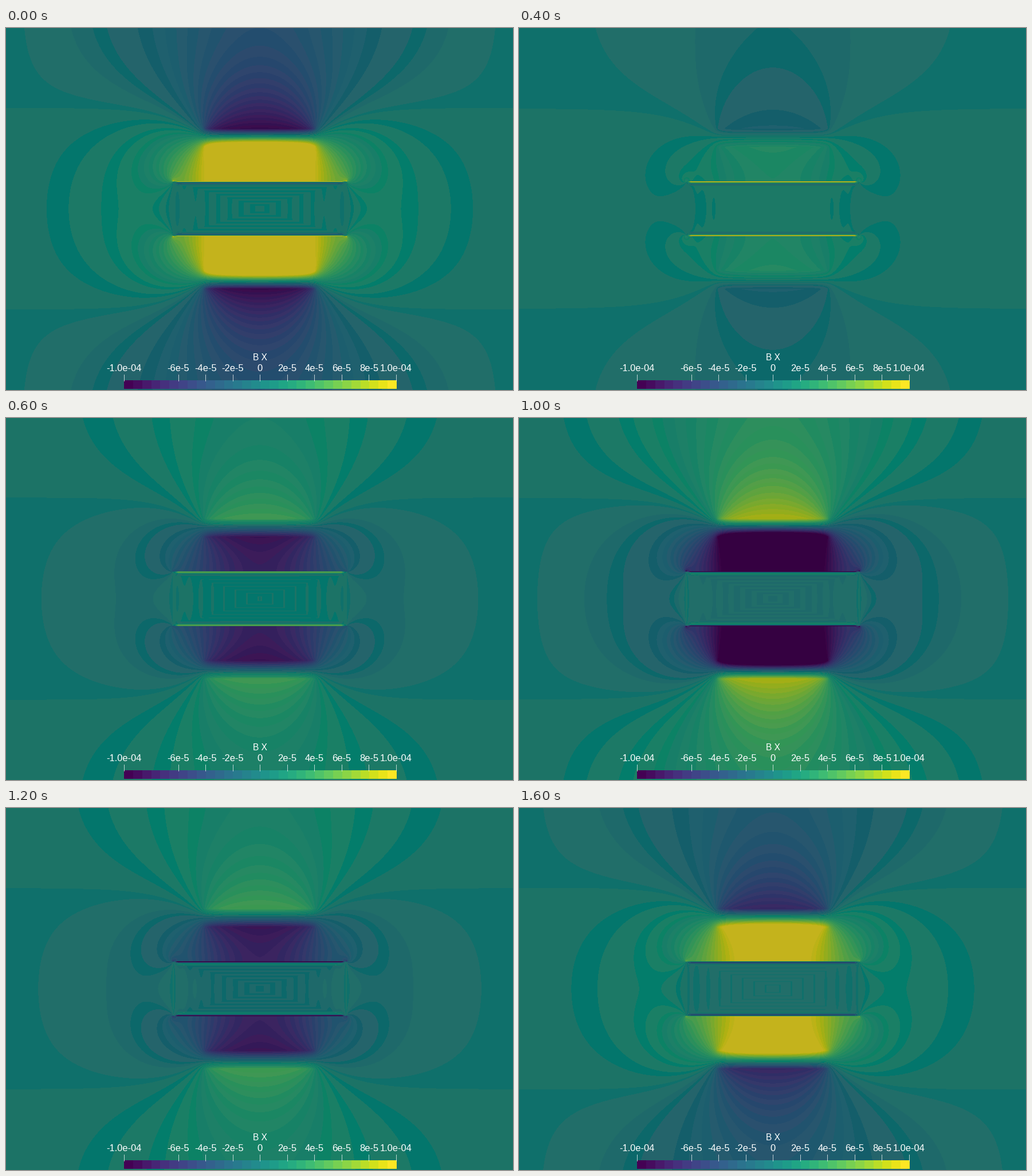
Write a matplotlib script that moves like this. It is 885x633 px and loops after 1.8 s.

```python
import numpy as np
import matplotlib
import matplotlib.pyplot as plt
from matplotlib.animation import FuncAnimation

W, H = 885, 633
FRAMES, STEP_MS = 9, 200

# Quarter domain in pixels: slab and coil are mirrored in both axes.
NX, NY = 443, 353
SLAB_X, SLAB_Y = 152, 48
COIL_X, COIL_Y0, COIL_Y1 = 97, 108, 140
CENTER_Y = 316
SHADE = 0.775

viridis = matplotlib.colormaps["viridis"]


# ---- magnetic field: vector potential from cosine / sine modes ----
ix, iy = np.arange(NX), np.arange(NY)
kx = np.pi * (ix + 0.5) / NX
ky = np.pi * (iy + 1) / NY
modes_x = np.sqrt(2 / NX) * np.cos(np.outer(ix + 0.5, kx))
modes_y = np.sqrt(2 / NY) * np.sin(np.outer(iy + 0.5, ky))
modes_y[:, -1] /= np.sqrt(2)
eigen = (2 - 2 * np.cos(kx))[:, None] + (2 - 2 * np.cos(ky))[None, :]


def potential(current):
    spectrum = modes_x.T @ current @ modes_y / eigen
    return modes_x @ spectrum @ modes_y.T


# Points on the slab surface, where the potential is prescribed.
surf_x = np.r_[np.arange(SLAB_X), np.full(SLAB_Y - 1, SLAB_X - 1)]
surf_y = np.r_[np.full(SLAB_X, SLAB_Y - 1), np.arange(SLAB_Y - 1)]


def surface_response():
    p, q = modes_x[surf_x], modes_y[surf_y]
    rows = [((p @ (np.outer(a, b) / eigen)) * q).sum(axis=1)
            for a, b in zip(p, q)]
    return np.array(rows)


response = surface_response()


def field(current, surface):
    """Bx for a coil current with a given potential on the slab surface."""
    base = potential(current)
    screen = np.zeros((NX, NY))
    screen[surf_x, surf_y] = np.linalg.solve(
        response, surface - base[surf_x, surf_y])
    return np.gradient(base + potential(screen), axis=1)


coil = np.zeros((NX, NY))
coil[:COIL_X, COIL_Y0:COIL_Y1] = 1
drive = field(coil, np.zeros(len(surf_x)))
drive *= 0.9 / -drive[0, COIL_Y1 + 3]

flux = np.where(surf_y == SLAB_Y - 1, 1 - (surf_x / SLAB_X) ** 8, 0)
trapped = field(np.zeros((NX, NY)), flux)

# Faint nested rectangles inside the slab.
gx, gy = np.meshgrid(ix, iy, indexing="ij")
inside = (gx < SLAB_X) & (gy < SLAB_Y - 1)
depth = np.minimum(SLAB_Y - gy, 0.3 * (SLAB_X - gx))
ripple = np.where(inside, 0.008 * np.cos(2 * np.pi * depth / 6) - 0.002, 0)

SKIN = 8
skin_depth = np.arange(SKIN)[::-1]
skin_lag = np.radians(45 + 35 * skin_depth)
skin_amp = 1.5 * np.exp(-0.6 * skin_depth)
skin_fade = np.clip((148 - ix) / 6, 0, 1)[:, None]


def bx(phase):
    b = drive * np.cos(phase) + 3 * trapped * np.cos(phase - np.radians(65))
    b = b + ripple
    rows = slice(SLAB_Y - SKIN, SLAB_Y)
    skin = skin_amp * np.cos(phase - skin_lag)
    b[:, rows] = skin_fade * (skin + ripple[:, rows]) \
        + (1 - skin_fade) * b[:, rows]
    return b


# ---- banded colours ----
NEAR_EDGES = [-.165, -.135, -.085, -.067, -.045, -.011, 0,
              .027, .045, .079, .099, .13, .15]
NEAR_COLORS = [(20, 94, 106), (36, 100, 107), (12, 104, 106), (30, 105, 106),
               (33, 110, 105), (15, 112, 107), (28, 115, 102), (3, 118, 108),
               (28, 121, 102), (3, 125, 107), (26, 127, 101), (12, 130, 101)]


def bands(start, stop, count):
    edges = np.linspace(start, stop, count + 1)
    t = np.linspace((start + 1) / 2, (stop + 1) / 2, count)
    colors = viridis(t)[:, :3] * 255 * SHADE
    colors[1:-1:2, 0] += 4
    colors[2:-1:2, 0] -= 4
    return edges, colors


low_edges, low_colors = bands(-1, NEAR_EDGES[0], 30)
high_edges, high_colors = bands(NEAR_EDGES[-1], 1, 34)
band_edges = np.r_[low_edges[1:-1], NEAR_EDGES, high_edges[1:-1]]
palette = np.vstack([low_colors, NEAR_COLORS, high_colors])
palette = palette.clip(0, 255).round().astype(np.uint8)


def picture(i):
    quarter = bx(2 * np.pi * i / FRAMES).T
    half = np.vstack([quarter[:CENTER_Y][::-1], quarter[:H - CENTER_Y]])
    full = np.hstack([half[:, ::-1], half[:, :W - NX]])
    return palette[np.searchsorted(band_edges, full)]


# ---- stage ----
fig = plt.figure(figsize=(W / 100, H / 100), dpi=100)
ax = fig.add_axes([0, 0, 1, 1])
ax.axis("off")
view = ax.imshow(picture(0), extent=(0, W, H, 0), interpolation="nearest",
                 aspect="auto")

BAR_L, BAR_R = 205.5, 681
bar = viridis(np.linspace(0, 1, 30))[None, :, :3]
ax.imshow(bar, extent=(BAR_L, BAR_R, 631, 616), interpolation="nearest",
          aspect="auto", zorder=2)


def label(x, y, text, px):
    ax.text(x, y, text, color="white", fontsize=px * 0.72, ha="center",
            va="baseline", family="Liberation Sans", zorder=4)


label(443.5, 581, "B X", 15.5)
for v in (-10, -6, -4, -2, 0, 2, 4, 6, 8, 10):
    x = BAR_L + (BAR_R - BAR_L) * (v + 10) / 20
    if abs(v) == 10:
        name = f"{v / 10:.1f}e-04"
    else:
        name = f"{v}e-5" if v else "0"
    label(x, 600, name, 16.5)
    ax.plot([x, x], [606, 617], color="white", lw=0.6, alpha=0.85, zorder=3)

ax.set_xlim(0, W)
ax.set_ylim(H, 0)


def update(i):
    view.set_data(picture(i))
    return [view]


anim = FuncAnimation(fig, update, frames=FRAMES, interval=STEP_MS,
                     repeat=True, repeat_delay=0, blit=False)
plt.show()
```
